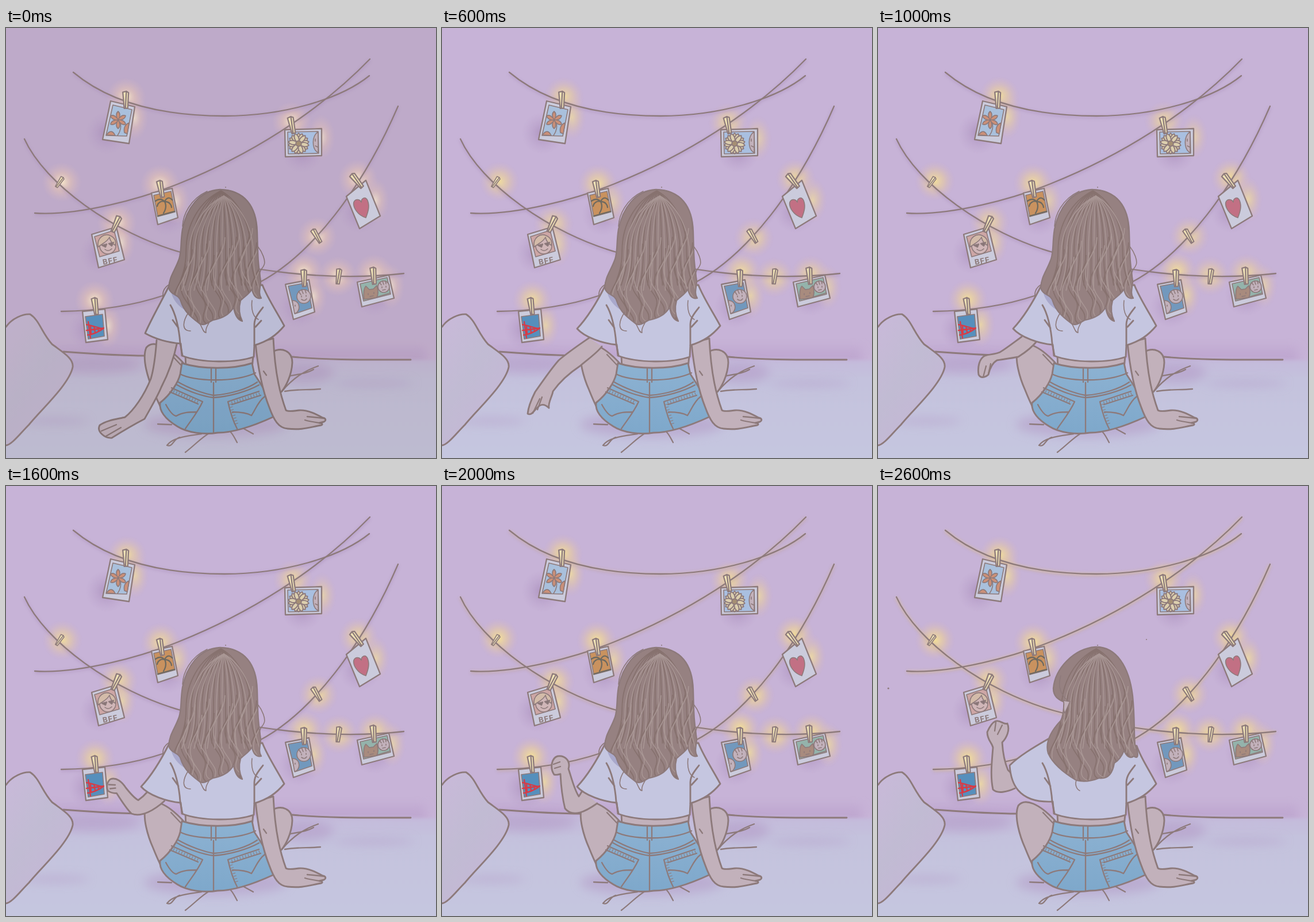
Recreate the animation shown at these times as an HTML page without scripts. Size 748 by 748 pixels, loop 3.1 s.

```html
<!DOCTYPE html>
<html lang="en">
<head>
<meta charset="utf-8">
<title>Fairy lights</title>
<style>
html, body { margin: 0; width: 100%; height: 100%; overflow: hidden; background: #c7b3d7 }
svg { display: block; width: 100%; height: 100% }
.line { fill: none }
.ink { stroke: #8d7a7b; stroke-width: 2.9; stroke-linecap: round; stroke-linejoin: round }
.thin { stroke-width: 2.3 }
.fine { stroke-width: 1.6 }
.skin { fill: #c2b1bb }
.card { fill: #cbcbdc }
.cloth { fill: #c5c6e0 }
.strand { vector-effect: non-scaling-stroke; fill: none }
.soft { filter: url(#blur) }

.arm, .fingers, .shirt, .dusk, .girl, .facing, .turned, .late, .jitterA, .jitterB, .warm, .core, .rim {
  animation: 3.1s step-end infinite
}
.arm { animation-name: arm }
.fingers { animation-name: fingers }
.shirt { animation-name: shirt }
.dusk { animation-name: dusk }
.girl { animation-name: girl }
.facing { animation-name: facing }
.turned { animation-name: turned }
.late { animation-name: late }
.jitterA { animation-name: jitterA }
.jitterB { animation-name: jitterB }
.warm { animation-name: warm }
.core { animation-name: core }
.rim { animation-name: rim }

/* Key poses; steps() fills in the held in-betweens. */
@keyframes arm {
  0% { d: path("M262 543C260 570 258 590 252 610C240 640 222 665 207 677C195 680 175 682 163 691C157 702 172 714 184 713C200 703 218 692 241 680C255 655 264 640 270 625C284 598 293 570 298 546") }
  6.45% { animation-timing-function: steps(2); d: path("M250 538C240 562 226 588 214 612C205 635 198 655 187 668C170 682 145 695 139 709C150 714 165 712 186 708C182 702 190 692 206 678C220 655 238 620 252 605C262 585 275 570 284 552") }
  19.35% { animation-timing-function: steps(2); d: path("M256 539C240 550 218 565 203 578C188 595 175 615 162 633C156 645 150 660 149 671C161 678 166 642 186 661C184 652 192 640 193 632C205 615 222 600 240 588C255 575 270 565 278 554") }
  32.25% { animation-timing-function: steps(2); d: path("M250 537C235 548 222 558 212 564C203 568 195 567 186 570C176 575 173 590 175 603C180 612 190 605 192 603C195 590 200 582 207 578C220 576 235 574 244 572C260 562 270 553 277 544") }
  45.16% { animation-timing-function: steps(2); d: path("M246 534C238 542 230 548 222 552C212 550 202 544 192 538C182 530 174 526 166 528C160 532 160 540 163 546C168 552 174 554 180 555C192 564 204 572 215 576C236 578 260 562 276 547") }
  58.06% { d: path("M244 532C242 536 240 538 238 541C233 535 230 525 225 512C222 500 210 486 197 492C191 498 189 506 191 514C197 517 202 515 205 514C210 532 216 552 222 564C236 576 258 564 275 549") }
  64.51% { animation-timing-function: steps(3); d: path("M244 530C242 534 240 537 238 540C230 528 226 510 220 492C224 478 214 468 201 470C191 473 187 490 195 502C199 503 203 502 206 501C207 522 210 545 214 561C228 578 250 566 270 552") }
  83.87%, 100% { d: path("M232 500C230 498 228 496 226 494C220 480 217 462 216 446C224 438 230 424 225 413C216 418 206 392 190 428C190 442 198 446 200 455C198 480 195 505 200 528C208 536 225 532 238 526") }
}
@keyframes fingers {
  0% { d: path("M166 701L192 690M174 710L200 695") }
  6.45% { animation-timing-function: steps(2); d: path("M150 711L172 692M166 711L182 692") }
  19.35% { animation-timing-function: steps(2); d: path("M158 670L170 645M166 664L174 642") }
  32.25% { animation-timing-function: steps(2); d: path("M183 607L188 588M192 602L196 584") }
  45.16% { animation-timing-function: steps(2); d: path("M164 537L176 540M166 544L178 546") }
  58.06% { d: path("M194 502L204 500M196 509L203 505") }
  64.51% { animation-timing-function: steps(3); d: path("M194 484L205 480M196 491L206 488") }
  83.87%, 100% { d: path("M205 411L203 426M216 416L208 432") }
}
@keyframes shirt {
  0% { d: path("M284 448C268 480 252 508 242 531C258 540 280 547 304 549L306 570C340 583 400 583 431 572L432 552C455 545 470 535 484 518C470 492 455 470 446 447Z") }
  6.45% { d: path("M284 448C268 480 252 505 235 523C248 538 280 549 304 551L306 570C340 583 400 583 431 572L432 552C455 545 470 535 484 518C470 492 455 470 446 447Z") }
  83.87%, 100% { d: path("M296 440C270 455 245 470 229 486C231 515 242 552 304 549L306 570C340 583 400 583 431 572L432 552C455 545 470 535 484 518C472 494 458 475 450 452Z") }
}
@keyframes dusk { 0% { opacity: .15 } 6.45%, 100% { opacity: 0 } }
@keyframes girl { 0% { filter: brightness(.95) } 6.45%, 100% { filter: none } }
@keyframes facing { 0% { opacity: 1 } 83.87%, 100% { opacity: 0 } }
@keyframes turned { 0% { opacity: 0 } 83.87%, 100% { opacity: 1 } }
@keyframes late { 0% { opacity: 0 } 70.96%, 100% { opacity: 1 } }
@keyframes warm { 0% { opacity: 0 } 64.51% { opacity: .3 } 83.87%, 100% { opacity: .5 } }
@keyframes core { 0% { stop-color: #fbecca } 6.45%, 100% { stop-color: #f7e394 } }
@keyframes rim { 0% { stop-color: #e3c2b5 } 6.45%, 100% { stop-color: #e8cca0 } }
@keyframes jitterA {
  0% { transform: translate(0, 0); opacity: 1 }
  6.45% { transform: translate(1px, -2px); opacity: .9 }
  12.9% { transform: translate(2px, 1px); opacity: .85 }
  19.35% { transform: translate(3px, -1px); opacity: .9 }
  25.8% { transform: translate(0, 1px); opacity: .85 }
  32.25% { transform: translate(2px, -2px); opacity: .95 }
  38.7% { transform: translate(4px, 0); opacity: .85 }
  45.16% { transform: translate(1px, 0); opacity: .9 }
  58.06% { transform: translate(3px, -2px); opacity: .95 }
  64.51% { transform: translate(1px, -3px); opacity: 1 }
  83.87%, 100% { transform: translate(2px, 0); opacity: 1 }
}
@keyframes jitterB {
  0% { transform: translate(0, 0); opacity: 1 }
  6.45% { transform: translate(2px, 1px); opacity: .85 }
  12.9% { transform: translate(-1px, -1px); opacity: .9 }
  19.35% { transform: translate(1px, 2px); opacity: .85 }
  25.8% { transform: translate(3px, 0); opacity: .9 }
  32.25% { transform: translate(1px, -1px); opacity: .85 }
  38.7% { transform: translate(-1px, 1px); opacity: .95 }
  45.16%, 58.06% { transform: translate(2px, 0); opacity: .9 }
  64.51% { transform: translate(3px, 1px); opacity: .95 }
  83.87%, 100% { transform: translate(0, -1px); opacity: .95 }
}
</style>
</head>
<body>
<svg viewBox="0 0 748 748">
<defs>
  <filter id="blur" x="-50%" y="-50%" width="200%" height="200%"><feGaussianBlur stdDeviation="9"/></filter>
  <filter id="haze"><feGaussianBlur stdDeviation="2.5"/></filter>
  <radialGradient id="glow"><stop class="core" stop-opacity=".95"/><stop class="rim" offset=".45" stop-opacity=".62"/><stop offset="1" stop-color="#d6b8c0" stop-opacity="0"/></radialGradient>
  <radialGradient id="dim"><stop stop-color="#a184b3" stop-opacity=".65"/><stop offset="1" stop-color="#b59bc8" stop-opacity="0"/></radialGradient>
  <linearGradient id="pillow" x2=".7" y2="1"><stop stop-color="#c9b9d9"/><stop offset=".5" stop-color="#c1bbd3"/><stop offset="1" stop-color="#c5b6d6"/></linearGradient>
  <linearGradient id="bed" x2="0" y2="1"><stop stop-color="#c4b8da"/><stop offset=".22" stop-color="#c4c2dd"/><stop offset="1" stop-color="#c6c7e0"/></linearGradient>
  <linearGradient id="denim" x2="0" y2="1"><stop stop-color="#8db2d2"/><stop offset="1" stop-color="#7ea8cb"/></linearGradient>

  <circle id="lamp" r="35" fill="url(#glow)"/>
  <ellipse id="halo" rx="25" ry="40" fill="url(#glow)" opacity=".75"/>
  <circle id="shade" r="36" fill="url(#dim)"/>
  <path id="peg" class="ink thin" fill="#f0e3b6" d="M-6-13L0-15 4-13 5 14-1 15Z M0-15L1 13"/>
  <path id="petal" d="M0 0C-4-5-4-12 0-15C4-12 4-5 0 0"/>
  <g id="flower">
    <use href="#petal"/><use href="#petal" transform="rotate(60)"/><use href="#petal" transform="rotate(120)"/>
    <use href="#petal" transform="rotate(180)"/><use href="#petal" transform="rotate(240)"/><use href="#petal" transform="rotate(300)"/>
  </g>
  <g id="strings">
    <path d="M117 77C190 138 290 153 380 153C480 153 580 125 632 83"/>
    <path d="M50 322C130 327 240 295 300 271C420 223 540 150 633 54"/>
    <path d="M32 193C68 272 188 358 307 391C420 422 560 442 692 427"/>
    <path d="M96 493C170 492 230 480 275 465M440 443C530 396 620 280 682 136"/>
  </g>

  <!-- Locks fan out from the crown, curls wave below them. -->
  <path id="lock" class="strand" d="M0 0C-40 18 -66 58 -66 104C-66 130 -72 145 -80 165"/>
  <g id="locks">
    <use href="#lock" transform="scale(.92 1)"/><use href="#lock" transform="scale(.78 1)"/><use href="#lock" transform="scale(.65 1)"/>
    <use href="#lock" transform="scale(.5 1)"/><use href="#lock" transform="scale(.36 1)"/><use href="#lock" transform="scale(.2 1)"/>
    <use href="#lock" transform="scale(.05 1)"/><use href="#lock" transform="scale(-.12 1)"/><use href="#lock" transform="scale(-.28 1)"/>
    <use href="#lock" transform="scale(-.45 1)"/><use href="#lock" transform="scale(-.6 1)"/><use href="#lock" transform="scale(-.78 1)"/>
  </g>
  <path id="curl" class="strand" d="M0 0C0 28 -24 42 -20 68S4 96 -4 118S4 140 10 146"/>
  <g id="curls">
    <use href="#curl" x="-62" y="128"/><use href="#curl" x="-50" y="102"/><use href="#curl" x="-38" y="120"/><use href="#curl" x="-25" y="92"/>
    <use href="#curl" x="-12" y="112"/><use href="#curl" x="2" y="86"/><use href="#curl" x="15" y="100"/><use href="#curl" x="27" y="80"/>
    <use href="#curl" x="39" y="96"/><use href="#curl" x="50" y="70"/><use href="#curl" x="62" y="90"/><use href="#curl" x="72" y="112"/>
  </g>
  <g id="strands">
    <g stroke="#87726f" stroke-width="1.9"><use href="#locks" x="374" y="283"/><use href="#curls" x="374" y="283"/></g>
    <g stroke="#a99795" stroke-width="1.5"><use href="#locks" x="379" y="292"/><use href="#curls" x="379" y="278"/></g>
  </g>
  <path id="backHair" d="M372 281C335 283 314 315 307 350C303 375 306 386 301 402C294 422 284 432 283 452C287 466 300 462 304 475C310 495 325 505 338 515C346 518 352 512 360 508C378 505 388 498 396 486C398 498 403 508 411 510C405 498 405 485 408 474C414 468 424 462 428 454C430 466 436 472 444 470C438 462 443 450 443 440C438 410 438 390 437 355C436 310 415 282 372 281Z"/>
  <path id="sideHair" d="M378 280C340 283 308 318 305 352C305 368 316 372 324 376C322 390 324 396 318 408C302 425 290 445 296 465C305 485 325 500 345 512C360 516 375 512 385 508C400 510 408 500 411 482C418 478 424 470 428 460C432 470 438 475 445 470C452 476 455 468 447 450C445 430 447 405 443 365C437 315 415 279 378 280Z"/>
  <clipPath id="backClip"><use href="#backHair"/></clipPath>
  <clipPath id="sideClip"><use href="#sideHair"/></clipPath>
</defs>

<rect width="748" height="748" fill="#c7b3d7"/>

<!-- Bed and pillow -->
<path class="soft" d="M70 556H730V590H70Z" fill="#b99fcb" opacity=".55"/>
<path filter="url(#haze)" d="M-20 571L100 567 240 572 500 576 768 578V768H-20Z" fill="url(#bed)"/>
<g class="soft" fill="#b299c6" opacity=".55">
  <ellipse cx="150" cy="585" rx="85" ry="16"/><ellipse cx="365" cy="690" rx="125" ry="22"/>
  <ellipse cx="520" cy="600" rx="50" ry="18"/><ellipse cx="85" cy="684" rx="60" ry="5"/><ellipse cx="640" cy="618" rx="70" ry="5"/>
</g>
<g class="ink line">
  <path d="M100 563C140 566 190 570 243 570M498 572C560 578 630 577 704 577"/>
  <path class="thin" d="M264 689L288 690M312 738C328 726 340 712 355 704M388 700C395 706 398 714 402 721M410 695L430 706M340 706C315 710 290 712 280 726C290 730 290 716 302 712M480 632C500 608 520 596 543 588M495 605C512 602 525 600 535 594M485 632C505 628 525 630 547 628"/>
  <path d="M0 520C10 505 30 497 42 498C58 508 62 530 80 550C100 565 118 575 116 590C110 620 60 665 40 690C25 705 10 725 0 726" style="fill:url(#pillow)"/>
</g>
<rect class="dusk" width="748" height="748" fill="#8c7878"/>

<!-- Light on the wall -->
<use href="#shade" x="175" y="183"/><use href="#shade" x="515" y="215"/><use href="#shade" x="280" y="325"/><use href="#shade" x="165" y="392"/>
<use href="#shade" x="615" y="320"/><use href="#shade" x="510" y="485"/><use href="#shade" x="640" y="465"/><use href="#shade" x="145" y="525"/>
<g class="jitterA">
  <use href="#lamp" x="209" y="121"/><use href="#lamp" x="268" y="272"/><use href="#lamp" x="612" y="263"/><use href="#lamp" x="518" y="425"/><use href="#lamp" x="154" y="474"/><use href="#lamp" x="97" y="268"/>
  <use href="#halo" x="223" y="156"/><use href="#halo" x="642" y="300"/><use href="#halo" x="534" y="467"/><use href="#halo" x="177" y="518"/>
</g>
<g class="jitterB">
  <use href="#lamp" x="497" y="163"/><use href="#lamp" x="193" y="339"/><use href="#lamp" x="541" y="363"/><use href="#lamp" x="577" y="432"/><use href="#lamp" x="640" y="428"/>
  <use href="#halo" x="548" y="190"/><use href="#halo" x="295" y="302"/><use href="#halo" x="200" y="374"/><use href="#halo" x="669" y="449"/>
</g>

<use href="#strings" class="line" stroke="#a98fb9" stroke-width="4" opacity=".5" filter="url(#haze)" y="2"/>
<g class="warm"><use href="#strings" class="line" stroke="#ead193" stroke-width="5" filter="url(#haze)" y="1"/></g>
<use href="#strings" class="ink thin line"/>

<!-- Photos -->
<g class="ink thin">
  <path class="card" d="M182 127L224 137 214 201 168 194Z"/>
  <path class="fine" fill="#a9c0dc" d="M186 134L219 142 210 188 174 187Z"/>
  <g class="fine" fill="#cc9078">
    <path class="line" d="M197 162C202 170 199 180 194 187"/>
    <use href="#flower" x="195" y="160"/><path d="M206 182C204 173 208 167 214 165L211 184ZM175 186C180 178 186 178 190 187Z"/>
  </g>

  <path class="card" d="M485 177L549 175 549 222 486 224Z"/>
  <path class="fine" fill="#a9bfe0" d="M490 181L543 180 544 218 491 219Z"/>
  <g class="fine" fill="#dccfae" transform="translate(509 201) scale(1.2)"><use href="#flower"/><use href="#flower" transform="rotate(20)"/><use href="#flower" transform="rotate(40)"/><circle r="4" fill="#a58f74"/></g>
  <path class="fine skin" d="M543 181C532 186 531 210 543 217ZM538 193V197M538 205L542 207"/>

  <path class="card" d="M253 287L289 279 299 330 264 342Z"/>
  <path class="fine" fill="#c9925f" d="M257 291L287 284 294 320 264 328Z"/>
  <path class="line" stroke="#6f6a60" d="M264 327L293 319M274 322C279 314 279 308 276 302C270 300 264 304 263 310M276 302C270 296 264 298 260 301M276 302C280 293 286 295 289 299M276 302C284 302 287 306 288 312"/>

  <path class="card" d="M149 359L192 346 206 403 161 417Z"/>
  <path class="fine" fill="#cda6a5" d="M154 363L188 352 197 388 163 398Z"/>
  <circle class="fine" cx="177" cy="379" r="14" fill="#d0b6b8"/>
  <path class="fine" fill="#d3bba9" d="M160 381C158 363 172 357 181 361C190 365 192 372 190 378C183 374 181 369 180 364C176 372 169 374 160 381Z"/>
  <path fill="#826f72" d="M167 378L175 376 173 381ZM179 375L187 373 184 379Z"/>
  <path class="line fine" d="M172 385C177 389 181 387 184 384"/>

  <path class="card" d="M592 293L626 265 651 327 615 349Z"/>
  <path class="fine" fill="#c27084" d="M626 330C612 326 603 312 605 303C608 296 616 298 618 303C618 296 625 292 629 300C633 310 630 320 626 330Z"/>

  <path class="card" d="M486 446L527 438 537 494 500 507Z"/>
  <path class="fine" fill="#7298bd" d="M491 449L524 443 532 487 503 497Z"/>
  <g class="fine skin"><circle cx="518" cy="467" r="12"/><path d="M498 474C510 474 513 487 506 495L502 497ZM509 458L513 464M514 455L517 462M520 455L522 461M514 466V468M522 465V467M514 472C518 475 521 474 523 471M503 482V484"/></g>

  <path class="card" d="M611 442L666 430 675 470 619 485Z"/>
  <path class="fine" fill="#94b3ab" d="M616 445L663 434 669 463 622 475Z"/>
  <path class="fine" fill="#a88b7e" d="M623 472C621 462 623 452 626 449L632 455 639 454 645 448C648 457 648 463 645 469ZM630 462V464M640 460V462M633 467L639 466"/>
  <g class="fine skin"><circle cx="657" cy="450" r="10"/><path d="M650 443L653 447M655 440L657 446M660 440L661 445M654 450V452M661 449V451M655 456L660 455M645 468L668 461"/></g>

  <path class="card" d="M133 493L172 489 177 542 139 547Z"/>
  <path class="fine" fill="#568fbc" d="M138 502L168 498 171 536 143 541Z"/>
  <path class="line" stroke="#d63c47" d="M140 526L170 522M143 511L147 539M140 516C149 517 160 522 169 523M147 519L148 532M153 519L155 529M160 521L161 527M142 534C151 533 162 528 169 523"/>
</g>
<text transform="translate(169 412) rotate(-11)" font-family="Inter, 'Open Sans', sans-serif" font-size="13" font-weight="700" letter-spacing="1" fill="#8d7a7b">BFF</text>

<!-- Pegs -->
<use href="#peg" transform="translate(208 125) rotate(5)"/>
<use href="#peg" transform="translate(497 169) rotate(-6)"/>
<use href="#peg" transform="translate(269 280) rotate(-5)"/>
<use href="#peg" transform="translate(191 341) rotate(30)"/>
<use href="#peg" transform="translate(610 266) rotate(-33)"/>
<use href="#peg" transform="translate(518 435) rotate(4)"/>
<use href="#peg" transform="translate(639 431) rotate(1)"/>
<use href="#peg" transform="translate(155 484) rotate(-2)"/>
<use href="#peg" transform="translate(93 268) rotate(40) scale(.7)"/>
<use href="#peg" transform="translate(540 362) rotate(-25) scale(.9)"/>
<use href="#peg" transform="translate(578 432) rotate(12) scale(.9)"/>

<!-- Girl -->
<g class="girl">
<g class="ink">
  <path class="skin" d="M308 582C280 552 255 542 244 556C236 575 247 610 256 630C262 645 270 665 280 678L330 640Z"/>
  <path class="line thin" d="M287 568L304 586"/>
  <path class="skin" d="M462 564C480 554 498 562 498 582C497 605 486 625 479 633L455 640Z"/>
  <path class="skin" d="M312 570L313 592H428L430 570Z"/>
  <path fill="url(#denim)" d="M306 583C340 594 395 594 428 583L432 602C445 622 460 642 466 676C440 688 400 704 368 704C345 708 315 704 298 693C280 682 266 668 268 652C288 636 300 615 303 602Z"/>
  <g class="line thin">
    <path d="M303 602C325 614 395 618 434 600M357 592V616M365 592V616M361 617V704M298 615C320 628 345 636 361 639C390 637 420 628 437 616M296 620C320 634 345 641 361 643C390 641 420 632 440 621"/>
    <path d="M288 626L342 650C334 668 322 682 312 697M285 633L334 654M278 655C284 666 290 674 296 675C308 668 320 668 331 668M440 632L386 650C390 668 394 682 402 697M443 639L393 655M394 668C408 668 420 670 427 674C434 664 438 650 450 641"/>
    <path stroke-width="5" stroke-dasharray="1 4" stroke-linecap="butt" d="M287 630L337 652M441 636L390 653L402 690"/>
  </g>
  <path class="skin" d="M434 548C438 590 446 630 458 660C466 682 474 696 490 697C515 700 530 694 548 691C552 690 550 687 545 687L553 685C557 683 557 679 551 678C540 672 525 664 510 665C500 666 492 668 487 665C478 640 468 605 465 540Z"/>
  <path class="line thin" d="M524 676C535 677 545 678 553 679M520 682C530 685 540 686 546 687M448 597L453 604"/>
  <path class="arm skin"/>
  <path class="fingers line thin"/>
  <path class="shirt cloth"/>
  <path class="line" d="M286 482C294 495 301 520 303 549L307 570M290 508L300 522M447 486C438 498 431 505 432 520V552M434 520L444 509"/>
</g>

<g class="facing">
  <path d="M286 452C288 472 300 486 318 494L312 455Z" fill="#a9a8cb"/>
  <use href="#backHair" fill="#968181"/>
  <g clip-path="url(#backClip)"><use href="#strands"/></g>
  <use href="#backHair" class="ink thin line"/>
  <path class="ink fine line" d="M390 283C424 292 437 325 435 350M350 284C320 298 308 325 307 345M438 380C446 390 452 405 449 412C446 420 440 420 442 432M318 494C306 512 306 527 321 527M337 514C342 522 343 530 348 530C346 522 352 516 354 511M428 474C426 490 430 503 439 507M284 446C274 452 272 460 273 468"/>
</g>
<g class="turned">
  <use href="#sideHair" fill="#968181"/>
  <g clip-path="url(#sideClip)"><use href="#strands" x="6"/></g>
  <use href="#sideHair" class="ink thin line"/>
  <path class="ink fine skin" d="M322 373C326 380 320 386 325 395L334 375Z"/>
  <path class="ink fine line" d="M345 512C342 520 346 528 351 530M318 330C312 350 318 362 330 374"/>
  <circle cx="467" cy="267" r="1" fill="#8d7a7b"/>
</g>
</g>
<circle cx="382" cy="277" r="1" fill="#8d7a7b"/>
<circle class="late" cx="18" cy="352" r="1.6" fill="#8d7a7b"/>
</svg>
</body>
</html>
```
